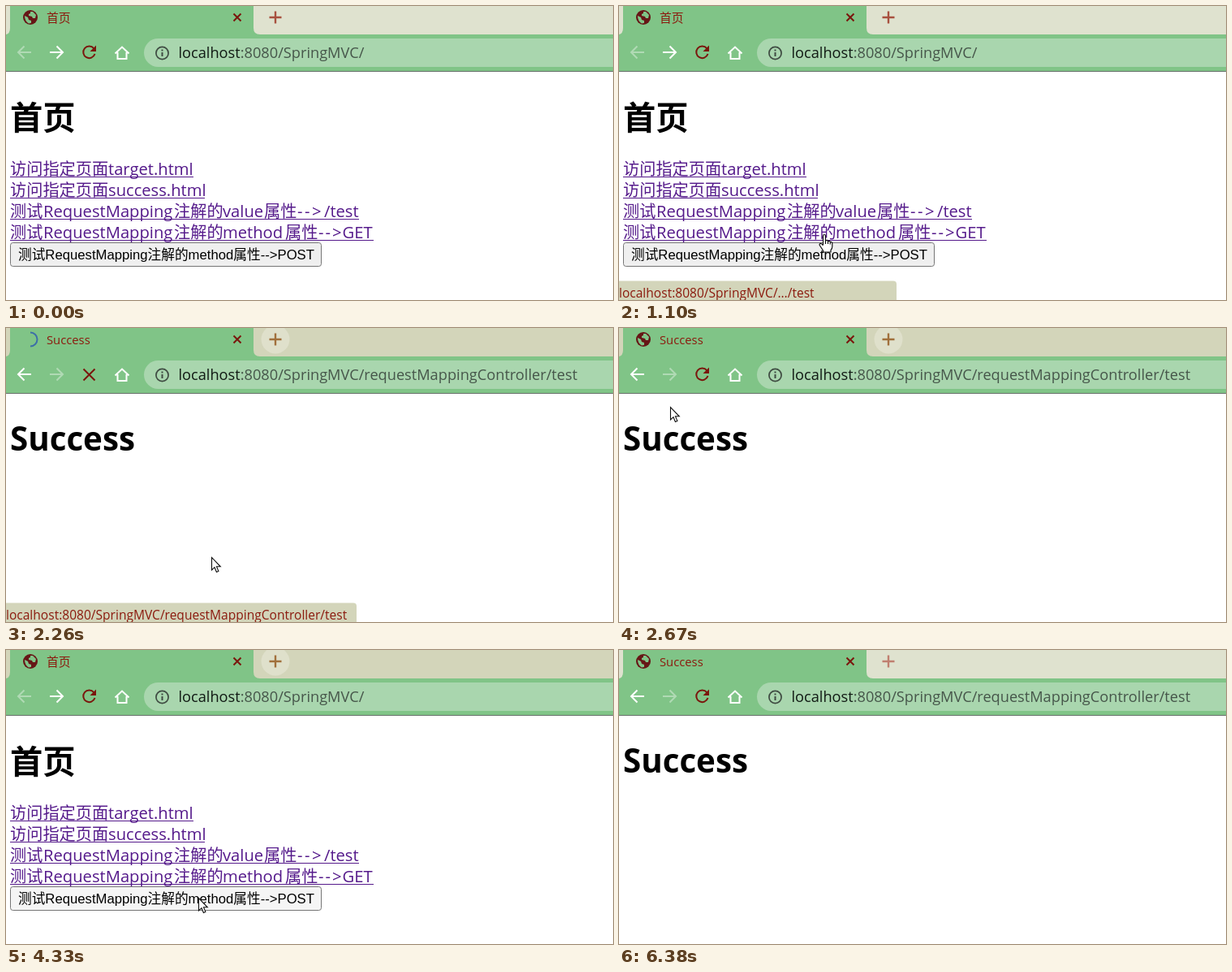
An HTML page for the animation above (6450 ms loop, 748x362 px).

```html
<!DOCTYPE html>
<html lang="zh-CN">
<head>
<meta charset="utf-8">
<title>首页</title>
<style>
html, body { margin: 0; width: 100%; height: 100%; overflow: hidden; background: #fff; }
svg { display: block; width: 748px; height: 362px; }
text { font-family: "Open Sans", "Noto Sans CJK SC", "Noto Sans CJK", sans-serif; white-space: pre; }
.ui { font-size: 15.55px; fill: #8b1a0e; }
.link { font-size: 20.2px; fill: #551a8b; }
.head { font-size: 40.3px; font-weight: 700; }
.btn { font-family: "Liberation Sans", "Noto Sans CJK SC", "Noto Sans CJK", sans-serif; font-size: 16.7px; }
.line { fill: none; stroke-width: 2; }
.nav { stroke: #fff; }
.red { stroke: #7a160d; }
</style>
</head>
<body>
<svg viewBox="0 0 748 362">
  <rect width="748" height="362" fill="#fff"/>
  <rect id="strip" width="748" height="40"/>
  <path d="M0 35Q5 34 5 27V0H305V27Q305 35 313 35H748V80H0Z" fill="#80c487"/>
  <rect y="80" width="748" height="1" fill="#66706a"/>

  <g id="globe">
    <circle cx="30" cy="14" r="9" fill="#661616"/>
    <path d="M23 12l4 2 1 3 3 1v3l-3 .5q-5-3-5-9.5zM30 7l3 0 4 4-1 4-3 0-1-2-4-1v-2l2-1z" fill="#80c487"/>
  </g>
  <path id="spinner" class="line" d="M30 5.5A8.5 8.5 0 0 1 30 22.5" stroke="#3d6ea8" stroke-width="2.2"/>
  <text id="title" x="50" y="19.5" class="ui" style="font-size:14.8px"></text>
  <path class="line red" d="M280.5 9.5l9 9m0-9l-9 9"/>
  <circle id="plusDisc" cx="332" cy="14" r="17.5" fill="#dfe0cb"/>
  <path id="plus" class="line" d="M324.500 14h15M332 6.500v15" style="stroke-width:2.4"/>

  <circle id="hover" cx="22.500" cy="57" r="17.500" fill="#000"/>
  <path id="back" class="line nav" d="M31 57H15.500M22.500 49.500L15 57l7.500 7.500"/>
  <path id="forward" class="line nav" d="M54 57H69.500M62.500 49.500L70 57l-7.500 7.500"/>
  <g id="reload">
    <path class="line red" d="M108.200 52.200A7.300 7.300 0 1 0 109.500 59"/>
    <path d="M111 48.500v7.500h-7.500z" fill="#7a160d"/>
  </g>
  <path id="stop" class="line red" d="M95.500 50.500l14 14m0-14l-14 14"/>
  <path class="line nav" d="M134.500 58.500L143 50.500l8.500 8M137.500 57v8h11v-8"/>

  <path d="M748 40H187.500a17.500 17.500 0 0 0 0 35H748Z" fill="#a9d6ae"/>
  <circle class="line" cx="192.500" cy="58" r="7.600" stroke="#3f4b42" style="stroke-width:1.700"/>
  <path class="line" d="M192.500 57v5M192.500 53.500v2" stroke="#3f4b42"/>
  <text x="212.500" y="64" style="font-size:18.200px" fill="#46564a"><tspan fill="#111a14">localhost</tspan><tspan id="url"></tspan></text>

  <g id="home">
    <text class="head" x="5" y="151.500">首页</text>
    <g id="links"></g>
    <rect id="button" x="5.500" y="291.500" width="383" height="29" rx="3" stroke="#767676"/>
    <text class="btn" x="15" y="312">测试RequestMapping注解的method属性--&gt;POST</text>
  </g>
  <text id="success" class="head" x="5" y="151">Success</text>

  <g id="status">
    <path id="statusBox" fill="#d3d5ba"/>
    <text id="statusText" class="ui" x="0" y="358.500"></text>
  </g>

  <path id="arrow" fill="#fff" stroke="#111" stroke-width="1.100" d="M.5 .5V16L4 12.700 6.400 18.500 8.900 17.400 6.500 11.800H11.300Z"/>
  <path id="hand" fill="#fff" stroke="#111" stroke-width="1.200" stroke-linejoin="round"
    d="M-1.500 13V2Q-1.500 .5 0 .5T1.500 2V8Q4 6.500 4.500 8.800 7 7.500 7.300 9.800 9.800 9 9.800 11.500V15Q9.800 18 8 19.500V22H-1.500V20L-5.500 14Q-6.500 12 -5 11.500T-1.500 14M1.500 8V12M4.500 9V12M7.300 10V12.500"/>
</svg>
<script>
const LOOP = 6450, STEP = 68.6;
const BURSTS = [0, 70, 960, 1830, 4260, 4960, 5500, 6380];
const PATH = '/SpringMVC/', TARGET = PATH + 'requestMappingController/test';

// Pointer tracks: time, x, y
const TRACKS = [
  [[70, 490, 346], [208, 455, 310], [346, 400, 275], [484, 330, 258], [619, 262, 264],
   [687, 250, 270], [756, 244, 275], [960, 246, 277], [1097, 253, 281], [2240, 253, 282],
   [2310, 253, 282], [2447, 124, 189], [2653, 63, 97], [2930, 24, 58], [3300, 24, 58],
   [3450, 90, 160], [3613, 188, 262], [3850, 222, 292], [4025, 237, 305], [4400, 237, 305],
   [4740, 248, 313], [4959, 248, 313], [4960, 253, 312], [5028, 400, 326], [5150, 600, 344]],
  [[5500, 614, 339], [5637, 430, 240], [5706, 330, 218], [5830, 297, 250]]
];

// Each link: runs of text with their left edges, then the right edge
const LINKS = [
  [['访问指定页面', 5], ['target.html', 126], 231],
  [['访问指定页面', 5], ['success.html', 126], 245],
  [['测试', 5], ['RequestMapping', 46], ['注解的', 207], ['value', 267], ['属性', 318], ['-->', 359, 2.5], ['/test', 392], 435],
  [['测试', 5], ['RequestMapping', 46], ['注解的', 207], ['method', 267], ['属性', 344], ['-->', 385, 2], ['GET', 414.5], 453]
];

const $ = id => document.getElementById(id);
const show = (id, on) => $(id).style.display = on ? '' : 'none';
const set = (id, key, value) => $(id).setAttribute(key, value);
const within = (t, a, b) => t >= a && t < b;
const ramp = (t, a, b) => Math.min(1, Math.max(0, (t - a) / (b - a)));

$('links').innerHTML = LINKS.map((link, i) => {
  const y = 208 + 26 * i, end = link[link.length - 1];
  const runs = link.slice(0, -1).map(([s, x, gap = 0]) =>
    `<tspan x="${x}" letter-spacing="${gap}">${s.replace('>', '&gt;')}</tspan>`).join('');
  return `<text class="link" y="${y}">${runs}</text><path d="M5 ${y + 2.5}H${end}" stroke="#551a8b" stroke-width="1.2"/>`;
}).join('');

function snap(t) {
  const start = BURSTS.filter(b => b <= t).pop();
  return start + Math.floor((t - start) / STEP) * STEP;
}

function pointer(t) {
  const track = TRACKS.find(k => within(t, k[0][0], k[k.length - 1][0]));
  if (!track) return null;
  const i = track.findIndex(k => k[0] > t);
  const [t0, x0, y0] = track[i - 1], [t1, x1, y1] = track[i];
  const p = ramp(t, t0, t1);
  return [x0 + (x1 - x0) * p, y0 + (y1 - y0) * p];
}

function overLink(x, y) {
  const link = LINKS[Math.floor((y - 190) / 26)];
  return !!link && x >= 5 && x <= link[link.length - 1];
}

function drawChrome(t, home) {
  const active = within(t, 1830, 6380);
  const loading = within(t, 1900, 2320) || within(t, 4330, 4750);
  set('strip', 'fill', active ? '#d3d5ba' : '#dfe2cf');
  show('plusDisc', active);
  set('plus', 'stroke', active ? '#a1703c' : t < 1830 ? '#a8503f' : '#c07f70');
  show('globe', !loading);
  show('spinner', loading);
  set('spinner', 'transform', `rotate(${(t - 2241.6) * 0.36} 30 14)`);
  show('reload', !loading);
  show('stop', loading);
  set('back', 'opacity', home ? 0.38 : 1);
  set('forward', 'opacity', home ? 1 : 0.38);
  set('hover', 'opacity', 0.12 * (ramp(t, 2900, 3100) - ramp(t, 3700, 4020)));
  $('title').textContent = home ? '首页' : 'Success';
  $('url').textContent = ':8080' + (home ? PATH : TARGET);
}

function drawStatus(t) {
  const w = 342 + 90 * ramp(t, 1830, 1967);
  show('status', within(t, 750, 2320));
  set('statusBox', 'd', `M0 338.5H${w - 4}q4 0 4 4V362H0Z`);
  $('statusText').textContent = 'localhost:8080' + (t < 1890 ? PATH + '…/test' : TARGET);
}

function drawPointer(t, home) {
  const at = pointer(t);
  const hand = at && home && overLink(...at);
  show('arrow', at && !hand);
  show('hand', hand);
  if (at) set(hand ? 'hand' : 'arrow', 'transform', `translate(${at.map(Math.round)})`);
}

function draw(now) {
  const t = snap(now % LOOP);
  const home = t < 2030 || within(t, 3300, 4530);
  show('home', home);
  show('success', !home);
  set('button', 'fill', within(t, 4260, 4390) ? '#f5f5f5' : t > 4020 ? '#e5e5e5' : '#efefef');
  drawChrome(t, home);
  drawStatus(t);
  drawPointer(t, home);
}

const begin = performance.now();
function tick() {
  draw(performance.now() - begin);
  requestAnimationFrame(tick);
}
tick();
</script>
</body>
</html>
```
